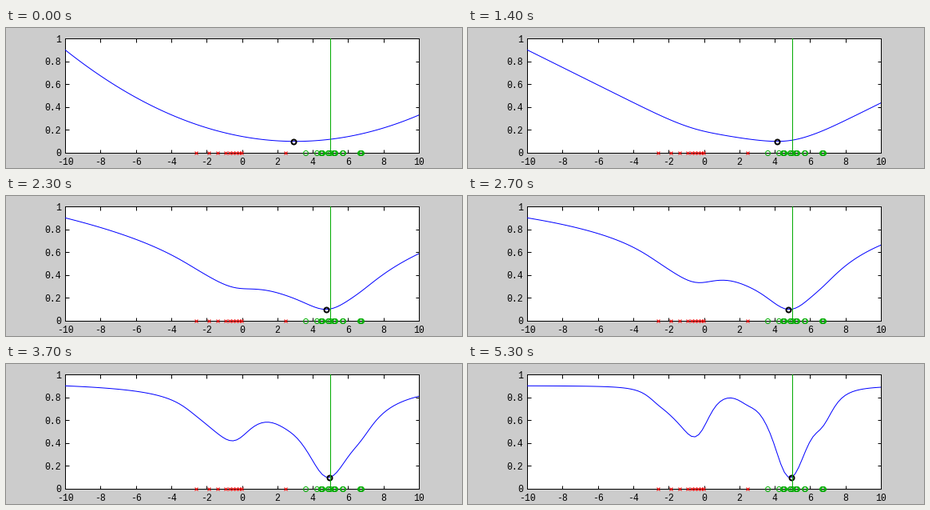
Recreate the animation shown at these times as a matplotlib script. Size 571x175 px, loop 5400 ms.

```python
import numpy as np
import matplotlib.pyplot as plt
from matplotlib.animation import FuncAnimation

W, H, DPI = 571, 175, 64
PX = 72 / DPI  # points per pixel
LEFT, RIGHT, TOP, BOTTOM = 74, 517, 13, 156
STEPS, HOLD = 50, 4
RED, GREEN = "#ff0000", "#00aa00"

inliers = np.array([3.6, 4.2, 4.45, 4.5, 4.5, 4.55, 4.85, 4.9, 5.0, 5.15, 5.2,
                    5.25, 5.65, 5.72, 6.65, 6.7, 6.75])
outliers = np.array([-2.58, -1.86, -1.37, -0.93, -0.72, -0.54, -0.36, -0.18,
                     -0.02, 2.48])
data = np.concatenate([inliers, outliers])

x = np.linspace(-10, 10, 100)
sq = 1 + (x[:, None] - data) ** 2
powers = np.linspace(2, -3, STEPS)


def cost(p):
    """Robust cost of the samples, scaled to the range 0.1 to 0.9."""
    c = np.sign(p) * (sq ** (p / 2)).sum(axis=1)
    return 0.1 + 0.8 * (c - c.min()) / (c.max() - c.min())


plt.rcParams["font.family"] = "Liberation Mono"
plt.rcParams["font.size"] = 11.5 * PX
plt.rcParams["axes.linewidth"] = PX

fig = plt.figure(figsize=(W / DPI, H / DPI), dpi=DPI, facecolor="#cccccc")
ax = fig.add_axes([LEFT / W, 1 - BOTTOM / H,
                   (RIGHT - LEFT) / W, (BOTTOM - TOP) / H])
ax.set_xlim(-10, 10)
ax.set_ylim(0, 1)
xt = range(-10, 11, 2)
yt = np.arange(6) / 5
ax.set_xticks(xt, [str(v) for v in xt])
ax.set_yticks(yt, [f"{v:g}" for v in yt])
ax.tick_params(direction="in", top=True, right=True,
               length=4.5 * PX, width=PX, pad=5 * PX)
ax.tick_params(axis="x", pad=6 * PX)


def marks(points, shape, size, color):
    ax.plot(points, np.zeros(len(points)), shape, ms=size * PX, mew=PX,
            mec=color, mfc="none", clip_on=False, zorder=5)


marks(outliers, "x", 4.5, RED)
marks(inliers, "o", 6, GREEN)

curve, = ax.plot([], [], color="#0000ff", lw=PX, zorder=3)
best, = ax.plot([], [], "o", ms=6 * PX, mew=2 * PX, mec="black",
                mfc="none", zorder=4)
ax.plot([5, 5], [0, 1], color=GREEN, lw=PX, zorder=4.5)


def draw(i):
    y = cost(powers[max(0, i - HOLD)])
    low = y.argmin()
    curve.set_data(x, y)
    best.set_data([x[low]], [y[low]])
    return curve, best


anim = FuncAnimation(fig, draw, frames=STEPS + HOLD, interval=100,
                     repeat=True, repeat_delay=0)
plt.show()
```
